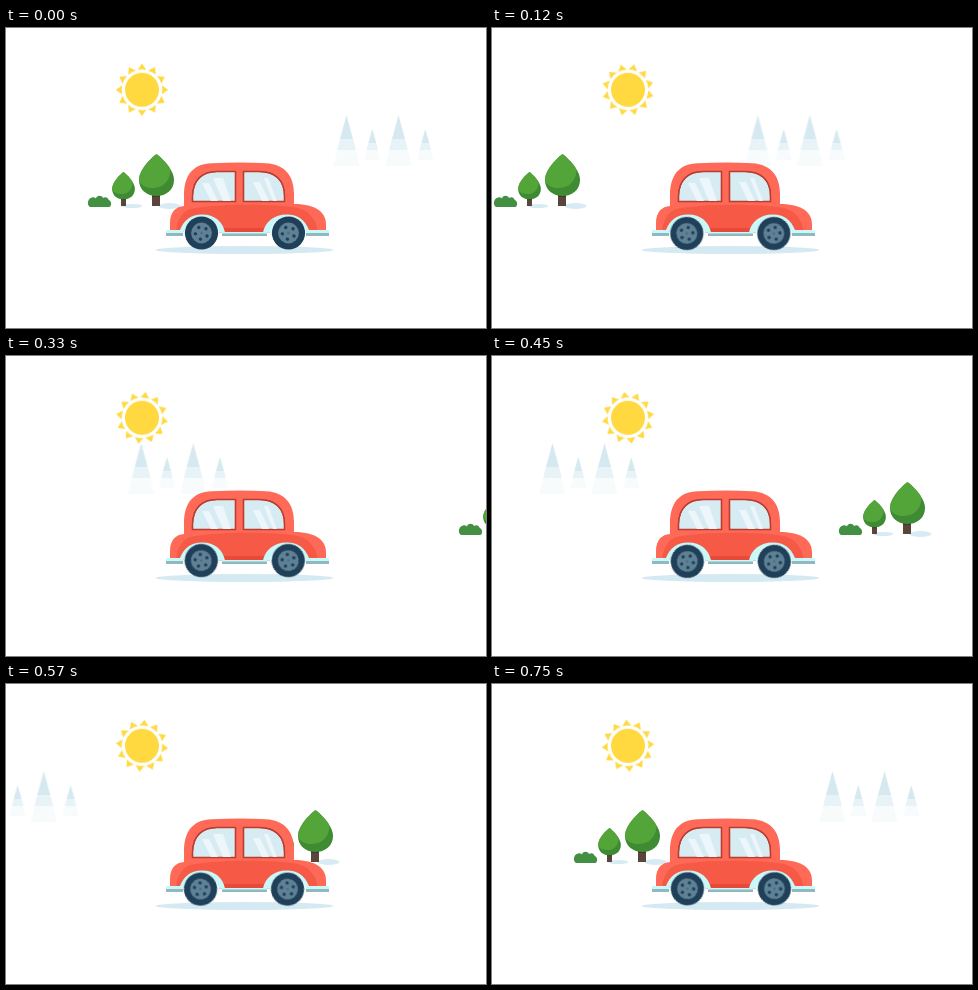
Write an HTML page that moves like this. It is 480 px wide and 300 px high and loops after 0.78 s.

```html
<!DOCTYPE html>
<html lang="en">
<head>
<meta charset="utf-8">
<title>Car ride</title>
<style>
  html, body { margin: 0; width: 100%; height: 100%; overflow: hidden; background: #fff; }
  svg { display: block; width: 480px; height: 300px; }

  .spin, .roll, .pines, .grove { animation: 780ms steps(26) infinite; }
  .spin { animation-name: spin; }
  .roll { animation-name: roll; }
  .pines { animation-name: pines; }
  .grove { animation-name: grove; }

  @keyframes spin { to { transform: rotate(90deg); } }
  @keyframes roll { to { transform: rotate(720deg); } }

  /* 26 ticks of 30 ms; the last tick rests at the start position */
  @keyframes pines {
    0% { transform: translateX(0); animation-timing-function: steps(25); }
    96.1538% { transform: translateX(-466.7px); animation-timing-function: step-end; }
    96.1539%, 100% { transform: translateX(0); }
  }
  @keyframes grove {
    0% { transform: translateX(0); animation-timing-function: steps(9); }
    34.6153% { transform: translateX(-180px); animation-timing-function: step-end; }
    34.6154% { transform: translateX(424px); animation-timing-function: steps(16); }
    96.1538%, 100% { transform: translateX(0); }
  }
</style>
</head>
<body>
<svg viewBox="0 0 480 300" xmlns="http://www.w3.org/2000/svg">
  <defs>
    <path id="ray" d="M0-26.2 4.4-19.8Q0-21-4.4-19.8Z"/>
    <g id="rays">
      <use href="#ray"/>
      <use href="#ray" transform="rotate(30)"/>
      <use href="#ray" transform="rotate(60)"/>
    </g>

    <g id="pine">
      <path fill="#f8fbfc" d="M-9.2 122H9.2L13 138H-13Z"/>
      <path fill="#e8f3f7" d="M-6.5 111H6.5L9.4 122H-9.4Z"/>
      <path fill="#d6e9f1" d="M0 87 6.5 111H-6.5Z"/>
    </g>
    <g id="sapling">
      <path fill="#f8fbfc" d="M-5.6 122H5.6L8 132H-8Z"/>
      <path fill="#e8f3f7" d="M-4 115H4L5.8 122H-5.8Z"/>
      <path fill="#d6e9f1" d="M0 101 4 115H-4Z"/>
    </g>

    <g id="wheel">
      <circle r="16.6" fill="#1f4058"/>
      <circle r="10.4" fill="#5f8195"/>
      <g id="holes" fill="#1f4058">
        <circle cx="6.2" r="1.7" transform="rotate(28)"/>
        <circle cx="6.2" r="1.7" transform="rotate(100)"/>
        <circle cx="6.2" r="1.7" transform="rotate(172)"/>
        <circle cx="6.2" r="1.7" transform="rotate(244)"/>
        <circle cx="6.2" r="1.7" transform="rotate(316)"/>
      </g>
      <circle r="1.2" fill="#4b6c81"/>
    </g>

    <path id="crown" d="M0 126C4 129 17.5 141 17.5 152C17.5 162 9.5 168 0 168S-17.5 162-17.5 152C-17.5 141-4 129 0 126Z"/>
    <clipPath id="crownClip"><use href="#crown"/></clipPath>
    <g id="leaves">
      <use href="#crown" fill="#3f8b34"/>
      <path clip-path="url(#crownClip)" fill="#53a53a" d="M-20 120H14V138C15 150 9 160-4 160C-11 160-16 157-20 150Z"/>
    </g>

    <path id="rearGlass" d="M186.5 173.5V168C187 152 196 143.5 211 143.5H229.5V173.5Z"/>
    <path id="frontGlass" d="M237.5 173.5V143.5H253C269 143.5 278.5 152 278.5 168V173.5Z"/>
    <clipPath id="glassClip"><use href="#rearGlass"/><use href="#frontGlass"/></clipPath>
  </defs>

  <g class="pines">
    <use href="#pine" x="340.5"/>
    <use href="#sapling" x="366.3"/>
    <use href="#pine" x="392.5"/>
    <use href="#sapling" x="419.3"/>
  </g>

  <g transform="translate(136 61.8)" fill="#ffd93f">
    <circle r="17"/>
    <g class="spin">
      <use href="#rays"/>
      <use href="#rays" transform="rotate(90)"/>
      <use href="#rays" transform="rotate(180)"/>
      <use href="#rays" transform="rotate(270)"/>
    </g>
  </g>

  <ellipse cx="238.5" cy="222" rx="89" ry="4" fill="#d5e9f2"/>

  <g class="grove">
    <g fill="#d8eaf4">
      <ellipse cx="126" cy="178" rx="10.5" ry="2"/>
      <ellipse cx="163.5" cy="178" rx="11" ry="3"/>
    </g>
    <path fill="#5b453b" d="M115 169h5v9h-5ZM146 165h8v13h-8Z"/>
    <path fill="#463530" d="M115 170h5v2h-5ZM146 166h8v3h-8Z"/>
    <use href="#leaves" transform="translate(117.5 62.1) scale(.65)"/>
    <use href="#leaves" x="150.5"/>
    <path fill="#439043" d="M84 179C80.5 177 81.500 170.500 86 169.500C87.500 169 89 169.500 90 170.500C90.500 167 96 167 97 170C99 168.500 102 169 102.700 172C105.500 173 106 177 103.500 179Z"/>
  </g>

  <g>
    <path fill="#ff6957" d="M164 204V195C164 184 170 178.500 178 178V168C178 148 186 136 206 135.300Q235 133.800 260 135.300C280 136.500 288 149 288 166V176C306 176 320 182 320 196V204Z"/>
    <path fill="#f65a47" d="M170 204C171 192 176 184 184 181C208 175.500 268 175.500 292 180C304 183 310 192 312 204Z"/>
    <path fill="#e74a38" d="M210 200H268V204.500H210Z"/>

    <g fill="#d7ebf3" stroke="#b93c30" stroke-width="1.4">
      <use href="#rearGlass"/>
      <use href="#frontGlass"/>
    </g>
    <g clip-path="url(#glassClip)" fill="#edf6fa">
      <path d="M196 155H203L212 173H205ZM207 150H217L225 173H217ZM247 154H254L263 173H256ZM258 150H262L271 173H267Z"/>
    </g>
    <path fill="none" stroke="#b93c30" stroke-width="1.200" d="M186.500 173.500V168C187 152 196 143.500 211 143.500H229.500V173.500ZM237.500 173.500V143.500H253C269 143.500 278.500 152 278.500 168V173.500Z"/>

    <g fill="#c9f8f8">
      <path id="arch" d="M160 202H174C178 192 185 186.500 196 186.500C209 186.500 217 194 219 204.500H212Q205 190 195 190Q184 190 177 205H160Z"/>
      <path d="M323 202H303C299 192 292 186.500 281 186.500C268 186.500 259 194 257 204.500H265Q272 190 282 190Q293 190 300 205H323Z"/>
      <path d="M216 204H261V206H216Z"/>
    </g>
    <g fill="#e6fbfc">
      <path d="M177 207Q181 188.500 195 188.500T214 207Z"/>
      <path d="M263 207Q267 188.500 282 188.500T301 207Z"/>
    </g>
    <path fill="#91b7bf" d="M160 205H177V208H160ZM216 205.500H261V208H216ZM300 205H323V208H300Z"/>
  </g>

  <g transform="translate(195 205)"><g class="roll"><use href="#wheel" x=".5"/></g></g>
  <g transform="translate(282 205)"><g class="roll"><use href="#wheel" x=".5"/></g></g>
</svg>
</body>
</html>
```
